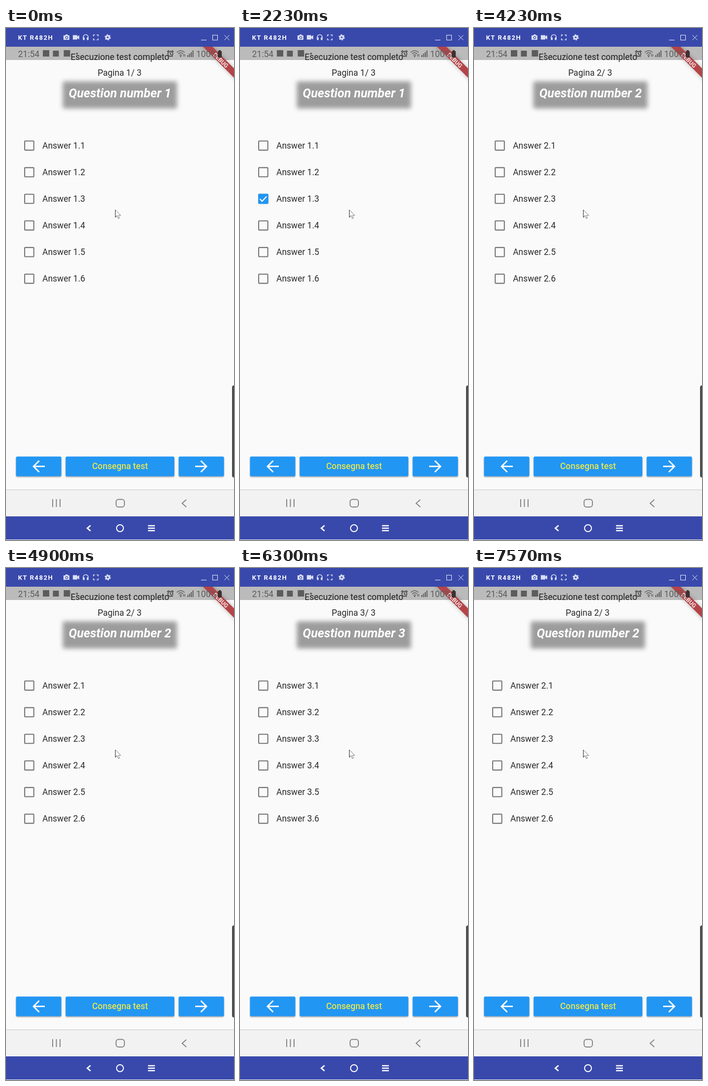
Animation, 464 px wide and 1040 px high, one loop 8000 ms. Source, as an HTML page:

```html
<!DOCTYPE html>
<html lang="it">
<head>
<meta charset="utf-8">
<title>Test</title>
<style>
  html, body { margin: 0; width: 100%; height: 100%; overflow: hidden; background: #fafafa; }
  svg { display: block; width: 100%; height: 100%; }
  text { font-family: Roboto, Arial, sans-serif; fill: #2b2b2b; }
  .body { font-size: 17.5px; }
  .status { font-size: 17.5px; fill: #5c5c5c; }
  .question { font-size: 25.1px; font-weight: 700; font-style: italic; fill: #fff; }
  .line { fill: none; stroke-linejoin: miter; }
</style>
</head>
<body>
<svg viewBox="0 0 464 1040" preserveAspectRatio="none">
  <defs>
    <clipPath id="view"><rect x="20" y="70" width="424" height="790"/></clipPath>
    <clipPath id="app"><rect y="38" width="464" height="900"/></clipPath>
    <filter id="soft" x="-10%" y="-40%" width="120%" height="180%"><feGaussianBlur stdDeviation="4.6"/></filter>
    <filter id="drop" x="-5%" y="-20%" width="110%" height="150%">
      <feDropShadow dx="0" dy="1.6" stdDeviation="1.3" flood-color="#000" flood-opacity=".4"/>
    </filter>
  </defs>

  <rect width="464" height="1040" fill="#fafafa"/>
  <text class="body" x="131.6" y="65">Esecuzione test completo</text>
  <g id="pages" clip-path="url(#view)"></g>

  <!-- buttons -->
  <g fill="#2196f3" filter="url(#drop)">
    <rect x="20.4" y="870.4" width="92.2" height="40" rx="2.5"/>
    <rect x="121.4" y="870.4" width="221.2" height="40" rx="2.5"/>
    <rect x="351.4" y="870.4" width="92.2" height="40" rx="2.5"/>
  </g>
  <text x="232" y="896" text-anchor="middle" font-size="17.6" font-weight="500" style="fill:#e9e64c">Consegna test</text>
  <g class="line" stroke="#fff" stroke-width="3">
    <path d="M79 890.5H56.5M67.5 879L56 890.5L67.5 902"/>
    <path d="M385 890.5H407.5M396.5 879L408 890.5L396.5 902"/>
  </g>
  <rect x="460" y="726" width="12" height="187" rx="4" fill="#4b4b4b"/>

  <!-- phone status strip -->
  <rect y="38" width="464" height="27" fill="#000" opacity=".255"/>
  <g clip-path="url(#app)">
    <path d="M392 29L473 110V91L411 29Z" fill="#000" opacity=".25" filter="url(#soft)"/>
    <path d="M392 29L473 110V91L411 29Z" fill="#b34448"/>
    <text transform="translate(437 65.5) rotate(45)" y="4.2" text-anchor="middle" font-size="11.8" font-weight="700" style="fill:#f6eaea">DEBUG</text>
  </g>
  <text class="status" x="24.5" y="59">21:54</text>
  <g fill="#5c5c5c">
    <rect x="75" y="45" width="13" height="13"/>
    <rect x="95.5" y="46" width="12" height="12"/>
    <rect x="117.5" y="45" width="13" height="13"/>
    <circle cx="144.5" cy="52" r="2"/>
  </g>
  <g class="line" stroke="#484848" stroke-width="1.8">
    <circle cx="334.5" cy="52.5" r="5"/>
    <path d="M334.5 49.5V53L337 54.5M328 48.5L331.5 45.5M341 48.5L337.5 45.5M330 58.5L331 57M339 58.5L338 57"/>
  </g>
  <g class="line" stroke="#5c5c5c" stroke-width="1.6">
    <path d="M347.5 49.5Q355.5 42.5 363.5 49.5M350.5 52.5Q355.5 48 360.5 52.5M353 55.5Q355.5 53 358 55.5"/>
    <path d="M361.5 53V58M364 53V58" stroke-width="1.2"/>
    <path d="M370 59V55M373.5 59V52M377 59V49M380.5 59V45.5" stroke-width="2"/>
  </g>
  <circle cx="355.5" cy="57.5" r="1.5" fill="#5c5c5c"/>
  <text class="status" x="387" y="59">100%</text>
  <path d="M431 47h2v-2h4v2h2v13h-8z" fill="#3f3032"/>

  <!-- phone navigation -->
  <rect y="938" width="464" height="54" fill="#f2f2f2"/>
  <rect y="937.5" width="464" height="1" fill="#c6c6c6"/>
  <g class="line" stroke="#868686" stroke-width="2">
    <path d="M95 957V973M102.5 957V973M110 957V973"/>
    <rect x="224" y="957.5" width="17" height="15.5" rx="5"/>
    <path d="M367 958L358.5 965.5L367 973"/>
  </g>

  <!-- window frame -->
  <g fill="#3949ab">
    <rect width="464" height="38"/>
    <rect y="992" width="464" height="47"/>
  </g>
  <text x="24.5" y="23.5" font-size="13" font-weight="700" letter-spacing="1.6" style="fill:#fff">KT R482H</text>
  <g fill="#d9def5">
    <path fill-rule="evenodd" d="M118 15h2.5l1.5-2h3l1.5 2h2.5v9h-12v-9zM123.5 16.5a3 3 0 1 0 .01 0z"/>
    <circle cx="123.5" cy="19.5" r="1.8"/>
    <path d="M136 14.5h9v3l4-3v9l-4-3v3h-9z"/>
    <rect x="156.5" y="19" width="3.5" height="5.5" rx="1"/>
    <rect x="164.5" y="19" width="3.5" height="5.5" rx="1"/>
  </g>
  <g class="line" stroke="#d9def5" stroke-width="1.6">
    <path d="M157.3 21V18.5a5 5 0 0 1 10 0V21"/>
    <path d="M178 17V14H181M184.5 14H187.5V17M187.5 21V24H184.5M181 24H178V21"/>
    <circle cx="207" cy="19" r="3.3" stroke-width="3"/>
    <circle cx="207" cy="19" r="5.3" stroke-width="2" stroke-dasharray="2.775"/>
  </g>
  <g class="line" stroke="#eef0fb" stroke-width="1">
    <path d="M397 24.5H408M444.5 14.5L454.5 24.5M454.5 14.5L444.5 24.5"/>
    <rect x="420.5" y="14.5" width="10" height="10"/>
  </g>
  <g class="line" stroke="#fff" stroke-width="2.4">
    <path d="M172 1010.5L165.5 1016L172 1021.5" stroke-width="2.8"/>
    <circle cx="232" cy="1016" r="7" stroke-width="2"/>
    <path d="M289 1011H303M289 1016H303M289 1021H303"/>
  </g>

  <!-- pointer -->
  <g class="line" stroke="#222" stroke-width="1">
    <path d="M222.5 369.5V384.5L226 381L228.5 387L231 386L228.5 380.5H233.5Z" fill="#fff" stroke="none"/>
    <path d="M222.5 369.5V384.5L226 381"/>
    <path d="M222.5 369.5L233.5 380.5H228.5L231 386L228.5 387L226 381" stroke-dasharray="1.5 1"/>
  </g>
</svg>
<script>
const LOOP = 8000, STEP = 1000 / 15, WIDTH = 424;
const CHECK_AT = 500, CHECKED_ROW = 2;
const swipes = [
  { at: 3700, from: 0, to: 1 },
  { at: 5170, from: 1, to: 2 },
  { at: 6630, from: 2, to: 1 }
];

const clamp = v => Math.max(0, Math.min(1, v));
const stepsSince = (t, at) => Math.floor((t - at + 5) / STEP);

function row(page, i) {
  const y = 239 + i * 54.1;
  const mark = page === 1 && i === CHECKED_ROW
    ? `<rect id="fill" x="37" y="${y - 10.5}" width="20.6" height="20.6" rx="2" fill="#2196f3"/>
       <path id="tick" class="line" d="M40.5 ${y}L45 ${y + 4.7}L54 ${y - 5}" stroke="#fff" stroke-width="2.2" pathLength="1" stroke-dasharray="1 2"/>`
    : '';
  return `<rect x="38" y="${y - 9.5}" width="18.6" height="18.6" rx="1" fill="none" stroke="#757575" stroke-width="2.1"/>
    ${mark}<text class="body" x="74" y="${y + 5.5}">Answer ${page}.${i + 1}</text>`;
}

function pageMarkup(page) {
  const rows = Array.from({ length: 6 }, (_, i) => row(page, i)).join('');
  return `<g>
    <text class="body" x="186.5" y="97">Pagina ${page}/ 3</text>
    <rect x="115.5" y="108.5" width="232.5" height="55" rx="3" fill="#9c9c9c" filter="url(#soft)"/>
    <text class="question" x="127.6" y="141">Question number ${page}</text>
    ${rows}</g>`;
}

const holder = document.getElementById('pages');
holder.innerHTML = [1, 2, 3].map(pageMarkup).join('');
const pages = [...holder.children];
const fill = document.getElementById('fill');
const tick = document.getElementById('tick');

// Fast start, long settling tail.
function glide(ms) {
  return 1 - Math.pow(1 - clamp((ms + 81) / 1315), 7);
}

function position(t) {
  let pos = 0;
  for (const s of swipes) {
    const n = stepsSince(t, s.at);
    if (n < 0) break;
    pos = n >= 12 ? s.to : s.from + (s.to - s.from) * glide(n * STEP);
  }
  return pos;
}

function draw(t) {
  const pos = position(t);
  pages.forEach((p, i) => p.setAttribute('transform', `translate(${((i - pos) * WIDTH).toFixed(2)} 0)`));
  const k = clamp((stepsSince(t, CHECK_AT) + 1) / 3);
  fill.setAttribute('opacity', clamp(k * 2));
  tick.setAttribute('stroke-dashoffset', 1 - clamp(k * 2 - 1));
  tick.setAttribute('opacity', k > .5 ? 1 : 0);
}

const start = performance.now();
function frame() {
  draw((performance.now() - start) % LOOP);
  requestAnimationFrame(frame);
}
frame();
</script>
</body>
</html>
```
